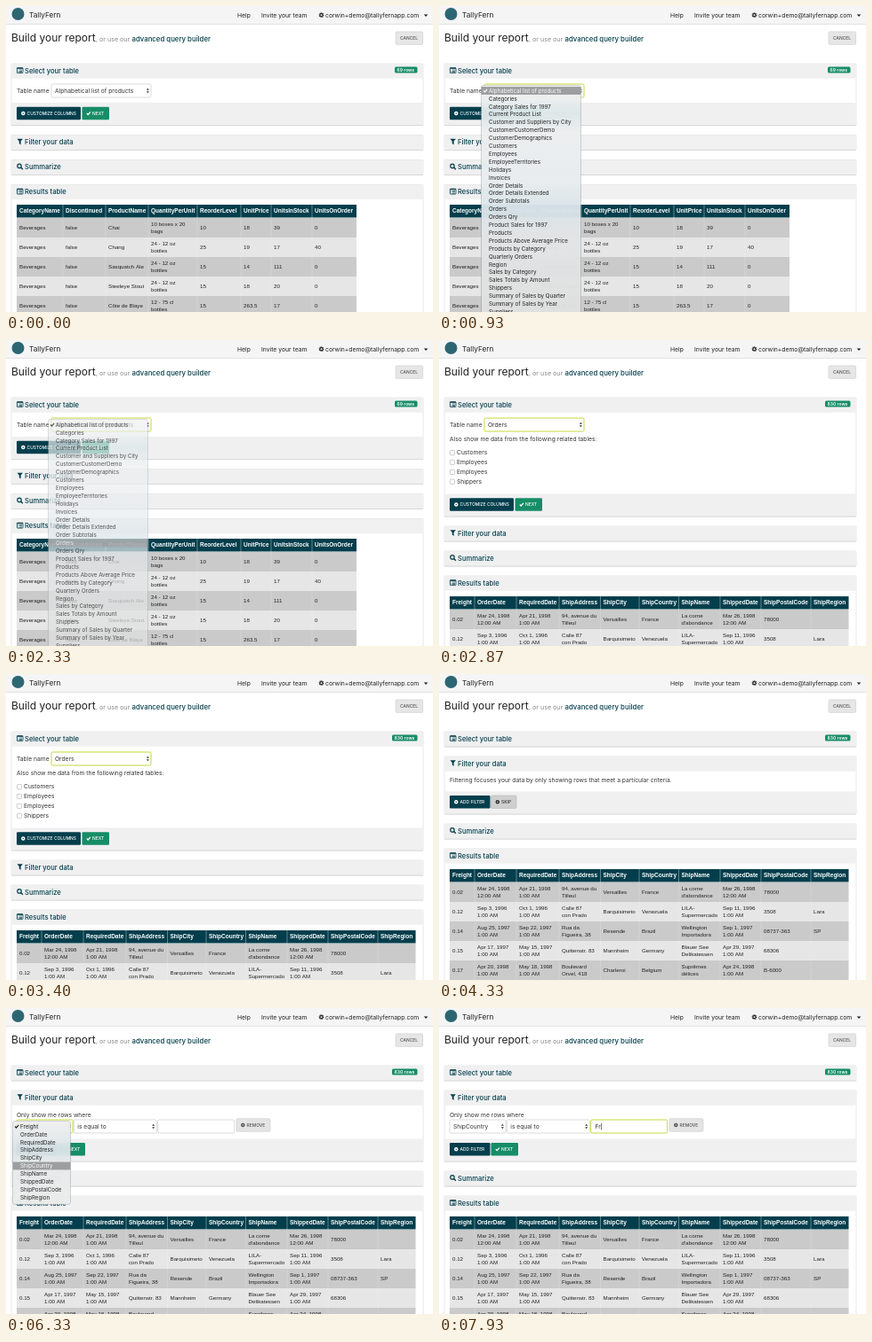
An HTML page with a canvas that plays this animation: 480 by 345 pixels, repeating every 8 s.

```html
<!DOCTYPE html>
<html lang="en">
<head>
<meta charset="utf-8">
<title>Report builder</title>
<style>
html, body { margin: 0; width: 100%; height: 100%; overflow: hidden; background: #fff; }
canvas { display: block; width: 100vw; height: 100vh; }
</style>
</head>
<body>
<canvas id="stage"></canvas>
<script>
const W = 480, H = 345, LOOP = 8000;
const TEAL = '#033e4c', GREEN = '#168d66', INK = '#333', FOCUS = '#c5d83c';
const UI = 'Inter, sans-serif', GRID = '"Liberation Sans", sans-serif';
const canvas = document.getElementById('stage');
const ctx = canvas.getContext('2d');

// Moments (ms) at which the interface changes.
const T = {
  tableOpen: 420, tableHover: 1250, tableHovered: 2050, tableClose: 2270, tableClosed: 2520,
  ordersLoaded: 2800, next: 3950, addFilter: 5130, fieldOpen: 5700, fieldHover: 5900,
  fieldHovered: 6250, fieldClose: 6520, fieldClosed: 6770, inputFocus: 7200, typeF: 7670, typeR: 7860
};

const tables = ['Alphabetical list of products', 'Categories', 'Category Sales for 1997',
  'Current Product List', 'Customer and Suppliers by City', 'CustomerCustomerDemo',
  'CustomerDemographics', 'Customers', 'Employees', 'EmployeeTerritories', 'Holidays', 'Invoices',
  'Order Details', 'Order Details Extended', 'Order Subtotals', 'Orders', 'Orders Qry',
  'Product Sales for 1997', 'Products', 'Products Above Average Price', 'Products by Category',
  'Quarterly Orders', 'Region', 'Sales by Category', 'Sales Totals by Amount', 'Shippers',
  'Summary of Sales by Quarter', 'Summary of Sales by Year', 'Suppliers'];

// Cells are separated by "|", lines in a cell by "/".
const products = {
  edges: [12, 64, 112, 160, 215, 264, 298, 344, 394],
  head: 'CategoryName|Discontinued|ProductName|QuantityPerUnit|ReorderLevel|UnitPrice|UnitsInStock|UnitsOnOrder',
  rows: [
    'Beverages|false|Chai|10 boxes x 20/bags|10|18|39|0',
    'Beverages|false|Chang|24 - 12 oz/bottles|25|19|17|40',
    'Beverages|false|Sasquatch Ale|24 - 12 oz/bottles|15|14|111|0',
    'Beverages|false|Steeleye Stout|24 - 12 oz/bottles|15|18|20|0',
    'Beverages|false|Côte de Blaye|12 - 75 cl/bottles|15|263.5|17|0']
};
const orders = {
  edges: [12, 40, 87, 135, 181.5, 225, 269.5, 316, 362, 418, 460.5],
  head: 'Freight|OrderDate|RequiredDate|ShipAddress|ShipCity|ShipCountry|ShipName|ShippedDate|ShipPostalCode|ShipRegion',
  rows: [
    "0.02|Mar 24, 1998/12:00 AM|Apr 21, 1998/1:00 AM|94, avenue du/Tilleul|Versailles|France|La corne/d'abondance|Mar 26, 1998/12:00 AM|78000|",
    '0.12|Sep 3, 1996/1:00 AM|Oct 1, 1996/1:00 AM|Calle 87/con Prado|Barquisimeto|Venezuela|LILA-/Supermercado|Sep 11, 1996/1:00 AM|3508|Lara',
    '0.14|Aug 25, 1997/1:00 AM|Sep 22, 1997/1:00 AM|Rua da/Figueira, 38|Resende|Brazil|Wellington/Importadora|Sep 1, 1997/1:00 AM|08737-363|SP',
    '0.15|Apr 17, 1997/1:00 AM|May 15, 1997/1:00 AM|Quittenstr. 83|Mannheim|Germany|Blauer See/Delikatessen|Apr 29, 1997/1:00 AM|68306|',
    '0.17|Apr 20, 1998/1:00 AM|May 18, 1998/1:00 AM|Boulevard/Orvel, 418|Charleroi|Belgium|Suprêmes/délices|Apr 24, 1998/1:00 AM|B-6000|']
};
const fields = orders.head.split('|');

const clamp = v => Math.max(0, Math.min(1, v));
const progress = (t, from, to) => clamp((t - from) / (to - from));

function text(s, x, y, size = 6.7, color = INK, weight = 400, family = UI) {
  ctx.font = `${weight} ${size}px ${family}`;
  ctx.fillStyle = color;
  ctx.fillText(s, x, y + size * 0.36);
}

function rect(x, y, w, h, color) {
  ctx.fillStyle = color;
  ctx.fillRect(x, y, w, h);
}

function box(x, y, w, h, radius, fill, border, lineWidth = 0.7) {
  ctx.beginPath();
  ctx.roundRect(x, y, w, h, radius);
  ctx.fillStyle = fill;
  ctx.fill();
  if (!border) return;
  ctx.strokeStyle = border;
  ctx.lineWidth = lineWidth;
  ctx.stroke();
}

function poly(points, color, lineWidth) {
  ctx.beginPath();
  points.forEach(([x, y]) => ctx.lineTo(x, y));
  if (lineWidth) {
    ctx.strokeStyle = color;
    ctx.lineWidth = lineWidth;
    ctx.stroke();
  } else {
    ctx.fillStyle = color;
    ctx.fill();
  }
}

function ring(x, y, r, color, lineWidth) {
  ctx.beginPath();
  ctx.arc(x, y, r, 0, 7);
  ctx.strokeStyle = color;
  ctx.lineWidth = lineWidth;
  ctx.stroke();
}

// Icons are centred on x, y.
const icons = {
  list(x, y) {
    box(x - 3.3, y - 3, 6.6, 6, 0.6, '#fff', TEAL, 0.8);
    rect(x - 3.3, y - 3, 6.6, 1.2, TEAL);
    for (const dy of [-0.7, 0.7, 2]) {
      rect(x - 2.2, y + dy - 0.3, 0.8, 0.7, TEAL);
      rect(x - 0.8, y + dy - 0.3, 3.2, 0.7, TEAL);
    }
  },
  funnel(x, y) {
    poly([[x - 3.2, y - 3.4], [x + 3.2, y - 3.4], [x + 0.9, y - 0.5], [x + 0.9, y + 3.4],
      [x - 0.9, y + 1.8], [x - 0.9, y - 0.5]], TEAL);
  },
  search(x, y) {
    ring(x - 0.7, y - 0.7, 2.2, TEAL, 1.2);
    poly([[x + 1, y + 1], [x + 3.2, y + 3.2]], TEAL, 1.4);
  },
  gear(x, y, color) {
    ctx.setLineDash([0.9, 0.7]);
    ring(x, y, 2.3, color, 1.2);
    ctx.setLineDash([]);
    ring(x, y, 1.6, color, 1.1);
  },
  dot(x, y, color) {
    ring(x, y, 1.5, color, 1.5);
  },
  check(x, y, color) {
    poly([[x - 2, y], [x - 0.6, y + 1.5], [x + 2.1, y - 1.6]], color, 1.2);
  }
};

function button(x, y, w, label, icon, fill, color = '#fff', border) {
  const h = 14.4;
  box(x, y, w, h, 1.2, fill, border);
  if (icon) icons[icon](x + 7.3, y + h / 2, color);
  text(label, x + (icon ? 11.6 : 5), y + h / 2, 4.9, color, 500);
}

function select(x, y, w, value, focused) {
  box(x, y, w, 15, 1.5, '#fff', focused ? FOCUS : '#ccc', focused ? 1 : 0.7);
  text(value, x + 4, y + 7.5);
  const ax = x + w - 3.6, ay = y + 7.5;
  poly([[ax - 1.5, ay - 0.7], [ax, ay - 2.8], [ax + 1.5, ay - 0.7]], INK);
  poly([[ax - 1.5, ay + 0.7], [ax, ay + 2.8], [ax + 1.5, ay + 0.7]], INK);
}

function menu(x, y, w, items, hovered, tints, opacity) {
  const pitch = 8.9, h = items.length * pitch + 5;
  const fill = ctx.createLinearGradient(0, y, 0, y + h);
  tints.forEach(([at, color]) => fill.addColorStop(at, color));
  ctx.save();
  ctx.globalAlpha = opacity * 0.97;
  box(x, y, w, h, 2.5, fill, 'rgba(0,0,0,.2)', 0.8);
  items.forEach((item, i) => {
    const cy = y + 6 + i * pitch, active = i === hovered;
    if (active) rect(x, cy - pitch / 2, w, pitch, '#9b9c9d');
    const color = active ? '#fff' : '#1c1c1c';
    if (i === 0) icons.check(x + 4.6, cy, color);
    text(item, x + 8.5, cy, 6.2, color);
  });
  ctx.restore();
}

// Draws a panel and returns the top of the next one.
function panel(y, title, icon, bodyHeight = 0, footerHeight = 0) {
  const bottom = y + 17 + bodyHeight;
  box(6, y, 463, 17 + bodyHeight, 0.8, '#fff', '#ddd');
  rect(6.3, y + 0.3, 462.4, 16.4, '#f0f0f1');
  rect(6.3, bottom - footerHeight, 462.4, footerHeight, '#f0f0f1');
  rect(6, bottom - 0.4, 463, 0.9, '#d6d6d6');
  icons[icon](15.7, y + 7.6);
  text(title, 21, y + 8, 7.6, TEAL, 500);
  return y + 28 + bodyHeight;
}

function grid(y, { edges, head, rows }) {
  const left = edges[0], width = edges.at(-1) - left, headHeight = 15, rowHeight = 22;
  rect(left, y, width, headHeight - 0.5, TEAL);
  head.split('|').forEach((s, i) => text(s, edges[i] + 3, y + 7, 6.5, '#fff', 700, GRID));
  rows.forEach((row, r) => {
    const top = y + headHeight + r * rowHeight;
    rect(left, top, width, rowHeight, r % 2 ? '#e6e6e6' : '#cacaca');
    row.split('|').forEach((cell, i) => {
      const lines = cell.split('/');
      lines.forEach((line, k) =>
        text(line, edges[i] + 3, top + 11 + (k - (lines.length - 1) / 2) * 8.4, 6.2, '#222', 400, GRID));
    });
  });
  edges.slice(1, -1).forEach(x => {
    rect(x - 0.3, y, 0.6, headHeight, 'rgba(255,255,255,.6)');
    rect(x - 0.3, y + headHeight, 0.6, rows.length * rowHeight, 'rgba(255,255,255,.25)');
  });
}

function pageHeader() {
  rect(0, 0, W, 20, '#f5f5f5');
  rect(0, 20, W, 0.8, '#dcdcdc');
  ctx.beginPath();
  ctx.arc(13.5, 9, 7, 0, 7);
  ctx.fillStyle = '#2c6672';
  ctx.fill();
  text('TallyFern', 26, 10.5, 8.2, '#222');
  text('Help', 260, 10.3, 6.8, '#222');
  text('Invite your team', 287, 10.3, 6.8, '#222');
  icons.gear(354.5, 10.2, '#222');
  text('corwin+demo@tallyfernapp.com', 359, 10.3, 6.8, '#222');
  poly([[469.7, 9.5], [474.3, 9.5], [472, 12]], '#222');
  text('Build your report', 6, 36, 12, '#222');
  text(', or use our', 101, 37, 7.1, '#888');
  text('advanced query builder', 141.5, 37, 7.8, TEAL, 500);
  button(438, 29, 30.5, 'CANCEL', null, '#e6e6e6', '#555', '#d2d2d2');
}

function tableBody(t, loaded) {
  text('Table name', 12, 95.5);
  select(51, 88, 112, t < T.tableClosed ? tables[0] : 'Orders', t >= T.tableOpen);
  if (loaded) {
    text('Also show me data from the following related tables:', 12, 111.5);
    ['Customers', 'Employees', 'Employees', 'Shippers'].forEach((label, i) => {
      const y = 127 + i * 10.9;
      box(12.4, y - 2.5, 5.2, 5.2, 1, '#fff', '#aaa', 0.6);
      text(label, 20, y);
    });
  }
  const y = loaded ? 178.3 : 113.8;
  button(12, y, 72, 'CUSTOMIZE COLUMNS', 'dot', TEAL);
  button(85.5, y, 30.5, 'NEXT', 'check', GREEN);
}

function filterBody(t) {
  if (t < T.addFilter) {
    text('Filtering focuses your data by only showing rows that meet a particular criteria.', 12, 120);
    button(12, 137, 45.5, 'ADD FILTER', 'dot', TEAL);
    button(58.5, 137, 28.5, 'SKIP', 'dot', '#cfcfcf', '#333', '#bbb');
    return;
  }
  const inputFocused = t >= T.inputFocus;
  text('Only show me rows where', 12, 120.3);
  select(12, 126, 63, t < T.fieldClosed ? 'Freight' : 'ShipCountry', t >= T.fieldOpen && !inputFocused);
  select(76.3, 126, 93, 'is equal to', false);
  box(170.7, 126, 86, 15, 1.5, '#fff', inputFocused ? FOCUS : '#ccc', inputFocused ? 1 : 0.7);
  const typed = t >= T.typeR ? 'Fr' : t >= T.typeF ? 'F' : '';
  text(typed, 175.5, 133.5);
  if (inputFocused) rect(175.8 + ctx.measureText(typed).width, 130, 0.6, 7.4, '#222');
  button(259, 124.8, 38, 'REMOVE', 'dot', '#e4e4e4', '#555', '#d0d0d0');
  button(12, 152, 45.5, 'ADD FILTER', 'dot', TEAL);
  button(58.5, 152, 30.5, 'NEXT', 'check', GREEN);
}

function draw(t) {
  const scale = canvas.width / W;
  ctx.setTransform(scale, 0, 0, canvas.height / H, 0, 0);
  rect(0, 0, W, H, '#fff');
  pageHeader();

  const loaded = t >= T.ordersLoaded, filtering = t >= T.next;
  const tableHeight = filtering ? 0 : loaded ? 117 : 52.5;
  const filterHeight = !filtering ? 0 : t < T.addFilter ? 48 : 63;
  const footer = 25.5;

  let y = panel(65, 'Select your table', 'list', tableHeight, filtering ? 0 : footer);
  const badgeX = loaded ? 434 : 437;
  box(badgeX, 68.5, 462.5 - badgeX, 7, 1.5, GREEN);
  text(loaded ? '830 rows' : '69 rows', badgeX + 2.6, 72, 5, '#fff', 600);
  if (!filtering) tableBody(t, loaded);

  y = panel(y, 'Filter your data', 'funnel', filterHeight, filtering ? footer : 0);
  if (filtering) filterBody(t);
  y = panel(y, 'Summarize', 'search');
  panel(y, 'Results table', 'list', H);
  grid(Math.round(y + 22.7), loaded ? orders : products);

  if (t >= T.tableOpen && t < T.tableClosed) {
    const hovered = Math.round(15 * progress(t, T.tableHover, T.tableHovered));
    menu(47.5, 89.5, 112, tables, hovered,
      [[0, '#f0f0f0'], [0.06, '#ebeeee'], [0.12, '#dce7e8'], [0.2, '#eceeef'], [0.42, '#e7ecee'],
        [0.53, '#d8e3e8'], [0.62, '#e2e5e6'], [1, '#dfdfdf']],
      1 - progress(t, T.tableClose, T.tableClosed));
  }
  if (t >= T.fieldOpen && t < T.fieldClosed) {
    const hovered = Math.round(5 * progress(t, T.fieldHover, T.fieldHovered));
    menu(7.5, 127.5, 65, fields, hovered,
      [[0, '#efefef'], [0.2, '#e4eaec'], [0.34, '#d6e2e6'], [0.5, '#e7eaeb'], [1, '#ebecec']],
      1 - progress(t, T.fieldClose, T.fieldClosed));
  }
}

function resize() {
  const ratio = window.devicePixelRatio || 1;
  canvas.width = Math.round(innerWidth * ratio);
  canvas.height = Math.round(innerHeight * ratio);
}

function frame() {
  draw(performance.now() % LOOP);
  requestAnimationFrame(frame);
}

addEventListener('resize', resize);
resize();
frame();
</script>
</body>
</html>
```
